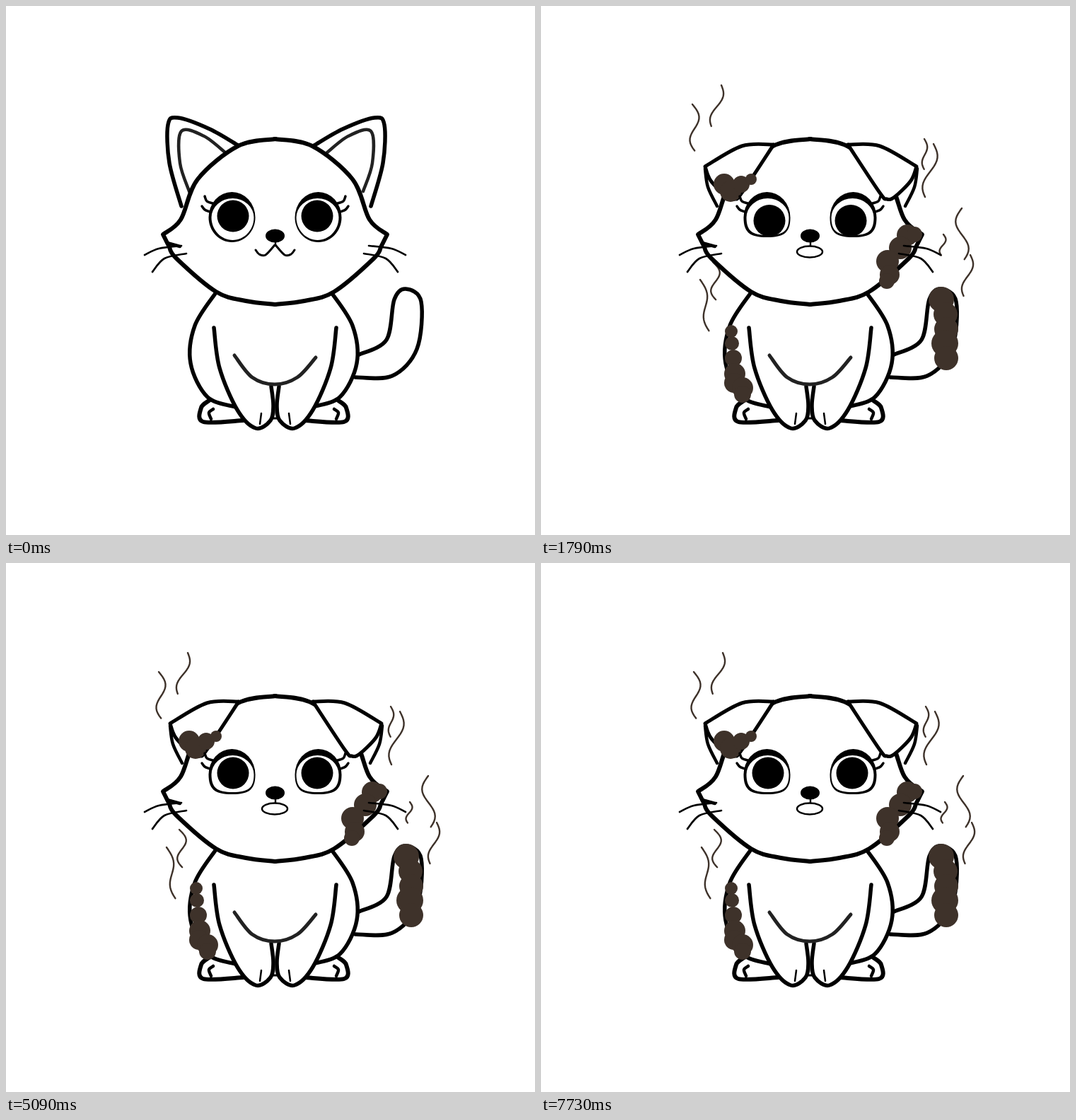
Animation, 748 px wide and 748 px high, one loop 8390 ms. Source, as an HTML page with a canvas:

```html
<!DOCTYPE html>
<html lang="en">
<head>
<meta charset="utf-8">
<title>Cat</title>
<style>
html, body { margin: 0; width: 100%; height: 100%; overflow: hidden; background: #fff; }
canvas { display: block; }
</style>
</head>
<body>
<canvas id="stage" width="748" height="748"></canvas>
<script>
const ctx = document.getElementById('stage').getContext('2d');
const LOOP = 8390, INK = '#000', SOFT = '#222', DIRT = '#3e322a';
ctx.lineCap = ctx.lineJoin = 'round';

// Smooth curve through "x,y x,y ..."; "|" marks a corner.
function trace(text) {
  ctx.beginPath();
  let end = null;
  for (const run of text.split('|')) {
    const p = run.trim().split(' ').map(s => s.split(',').map(Number));
    if (end) p.unshift(end);
    else ctx.moveTo(...p[0]);
    for (let i = 0; i < p.length - 1; i++) {
      const a = p[i - 1] || p[i], b = p[i], c = p[i + 1], d = p[i + 2] || c;
      ctx.bezierCurveTo(b[0] + (c[0] - a[0]) / 6, b[1] + (c[1] - a[1]) / 6,
        c[0] - (d[0] - b[0]) / 6, c[1] - (d[1] - b[1]) / 6, c[0], c[1]);
    }
    end = p[p.length - 1];
  }
}

function stroke(width, color = INK) {
  ctx.lineWidth = width;
  ctx.strokeStyle = color;
  ctx.stroke();
}

function fill(color = '#fff') {
  ctx.fillStyle = color;
  ctx.fill();
}

function line(text, width, color) {
  trace(text);
  stroke(width, color);
}

function shape(text, width) {
  trace(text);
  fill();
  stroke(width);
}

function oval(x, y, rx, ry = rx) {
  ctx.beginPath();
  ctx.ellipse(x, y, rx, ry, 0, 0, 2 * Math.PI);
}

// Draws once as is and once flipped, so that x becomes sum - x.
function mirrored(sum, draw) {
  draw();
  ctx.save();
  ctx.translate(sum, 0);
  ctx.scale(-1, 1);
  draw();
  ctx.restore();
}

// One sine wave along the way from start to end.
function wisp(x0, y0, x1, y1, swing) {
  ctx.beginPath();
  for (let s = 0; s <= 1; s += 0.05) {
    ctx.lineTo(x0 + (x1 - x0) * s + swing * Math.sin(2 * Math.PI * s), y0 + (y1 - y0) * s);
  }
  stroke(2.4, DIRT);
}

function smoke(raised) {
  ctx.save();
  if (!raised) ctx.translate(2, 15);
  wisp(214, 139, 220, 208, 8);
  wisp(255, 112, 242, 173, 6);
  wisp(542, 188, 543, 233, 4);
  wisp(555, 195, 545, 274, 8);
  wisp(595, 286, 596, 362, -9);
  wisp(569, 323, 567, 354, 4);
  wisp(607, 352, 599, 413, 6);
  wisp(225, 387, 240, 463, 6);
  wisp(243, 362, 250, 418, 8);
  ctx.restore();
}

function blob(...lobes) {
  for (const lobe of lobes) {
    oval(...lobe);
    fill(DIRT);
  }
}

function spots() {
  blob([259, 252, 15], [268, 262, 15], [283, 252, 12], [297, 245, 8]);
  blob([518, 324, 15], [528, 323, 11], [508, 342, 16], [490, 361, 16], [493, 380, 14], [489, 389, 11]);
  blob([566, 415, 18], [572, 436, 17], [573, 457, 17], [571, 477, 19], [573, 498, 17]);
  blob([269, 460, 9], [270, 477, 10], [272, 498, 12], [274, 520, 15], [273, 533, 14], [285, 540, 15], [285, 549, 12]);
}

function body() {
  shape('499,493 538,472 549,415 565,400 587,418 581,485 546,523 494,525', 5.5);
  mirrored(757, () => {
    shape('287,558 276,568 279,588 335,586', 6);
    line('293,570 287,575 290,584', 4.5);
    shape('297,405 267,452 261,505 285,553 325,567', 5.5);
  });
  mirrored(761, () => {
    shape('294,455 302,512 327,571 353,597 374,586 378,565 375,538', 5.5);
    line('361,576 359,591', 2.5);
  });
  line('375,583 385,583', 3);
  line('323,494 348,525 380,535 412,525 438,497', 5, SOFT);
}

function backOfEar(folded) {
  if (folded) {
    line('232,230 236,256 249,283', 4.5);
  } else {
    shape('328,197 288,174 243,158 229,168 231,222 248,283', 5.5);
    line('311,208 280,184 248,177 246,222 259,262', 4.5, SOFT);
  }
}

function foldedEar() {
  shape('329,196 284,198 232,227 | 240,247 263,270 274,273 284,264 329,196', 5);
}

function head() {
  mirrored(761, () => shape('381,188 328,198 271,245 247,302 222,323 | 231,341 | 241,357 297,404 339,417 381,422', 6));
  line('228,335 246,340', 4.5);
}

// Half ellipse above; the half below gets squarer as "square" nears 1.
function eyeOutline(x, y, rx, above, below, square) {
  ctx.beginPath();
  ctx.ellipse(x, y, rx, above, 0, Math.PI, 2 * Math.PI);
  ctx.bezierCurveTo(x + rx, y + square * below, x + square * rx, y + below, x, y + below);
  ctx.bezierCurveTo(x - square * rx, y + below, x - rx, y + square * below, x - rx, y);
}

function eye(squint, down) {
  const below = squint ? 25 : 32, square = squint ? 0.75 : 0.55;
  eyeOutline(319.5, 299, 33, 36, below + 3, square);
  fill(INK);
  eyeOutline(320.5, 299, 30, 27, below, square);
  fill();
  line('292,279 284,276 281,269', 3.5);
  line('288,291 281,288 277,283', 3.5);
  oval(321 + (down ? 2 : 0), 297 + (down ? 6.5 : 0), 22.5);
  fill(INK);
}

function face(t) {
  mirrored(761, () => eye(t >= 860, t >= 1060 && t < 1460 || isRaised(t)));
  oval(380.5, 325, 13.5, 9.5);
  fill(INK);
  line('381,332 381,339', 2.4);
  if (t < 200) {
    mirrored(761, () => line('353,345 358,351 367,352 380,338', 3));
  } else {
    oval(380, 347.5, 18, 8);
    stroke(2.5);
  }
  mirrored(761, () => {
    line('196,352 216,343 248,339', 2.7);
    line('207,376 224,357 255,350', 2.7);
  });
}

function isRaised(t) {
  return t >= 1790 && Math.floor((t - 1790) / 660) % 2 === 0;
}

function draw() {
  const t = performance.now() % LOOP, folded = t >= 860;
  ctx.fillStyle = '#fff';
  ctx.fillRect(0, 0, 748, 748);
  if (t >= 1460) smoke(isRaised(t));
  body();
  mirrored(764, () => backOfEar(folded));
  head();
  if (folded) mirrored(763, foldedEar);
  if (t >= 1260) spots();
  face(t);
  requestAnimationFrame(draw);
}
draw();
</script>
</body>
</html>
```
